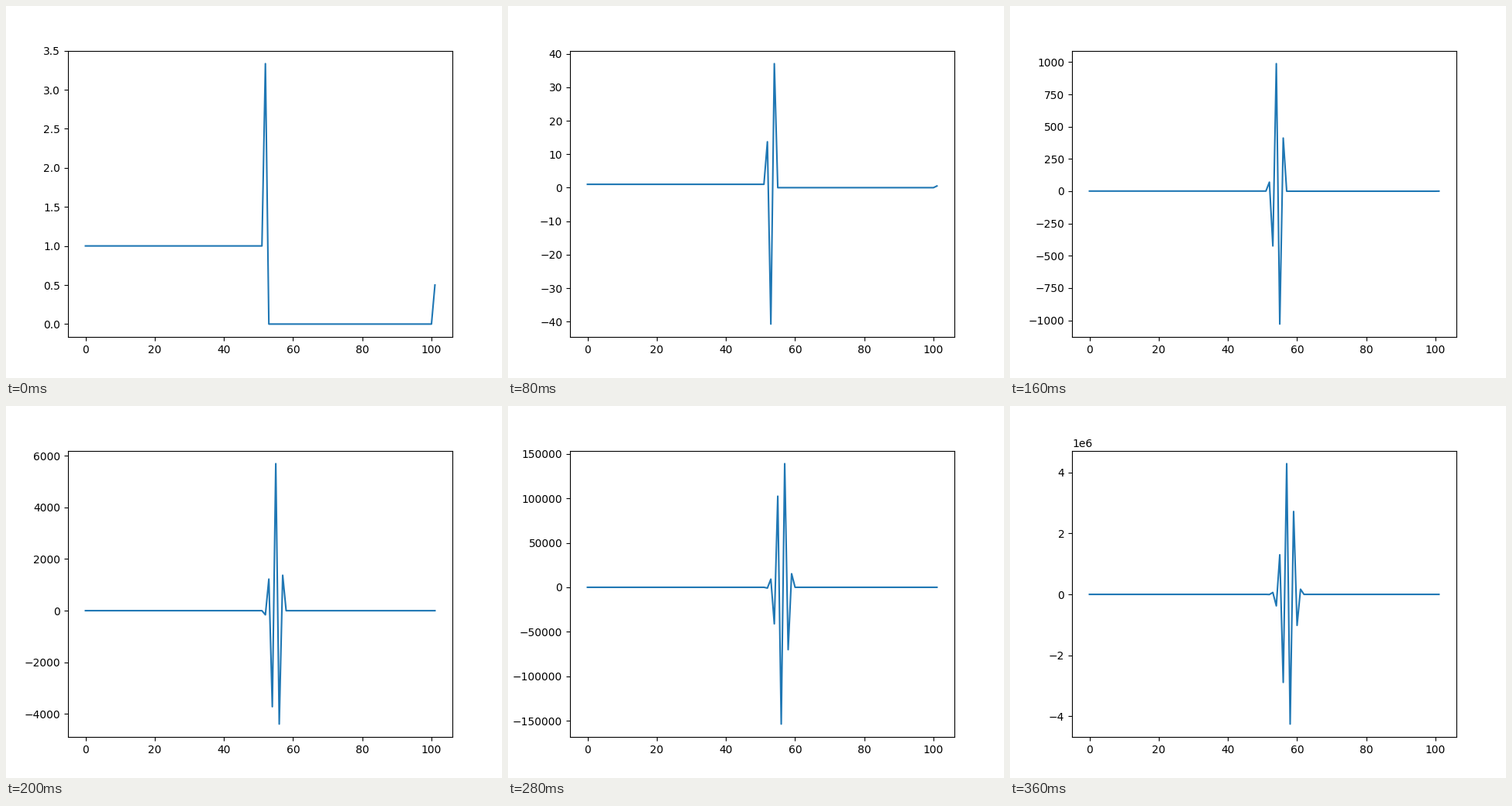
Write a matplotlib script that moves like this. It is 640 by 480 pixels and loops after 0.4 s.

```python
import matplotlib.pyplot as plt
import numpy as np
from matplotlib.animation import FuncAnimation

CELLS = 102
STEP_EDGE = 52      # first cell behind the jump
COURANT = 10 / 3    # far above the stability limit, so the upwind scheme blows up
FRAMES = 10


def solve(steps):
    """Advect a step profile with the first-order upwind scheme."""
    u = np.where(np.arange(CELLS) < STEP_EDGE, 1.0, 0.0)
    u[-1] = 0.5     # fixed end cell
    for _ in range(steps):
        u[1:-1] -= COURANT * (u[1:-1] - u[:-2])
    return u


fig, ax = plt.subplots(figsize=(6.4, 4.8), dpi=100)


def draw(frame):
    ax.clear()
    return ax.plot(solve(frame + 1), color="#1f77b4", lw=1.5)


anim = FuncAnimation(fig, draw, frames=FRAMES, interval=40,
                     init_func=lambda: draw(0), repeat=True, repeat_delay=0)
plt.show()
```
